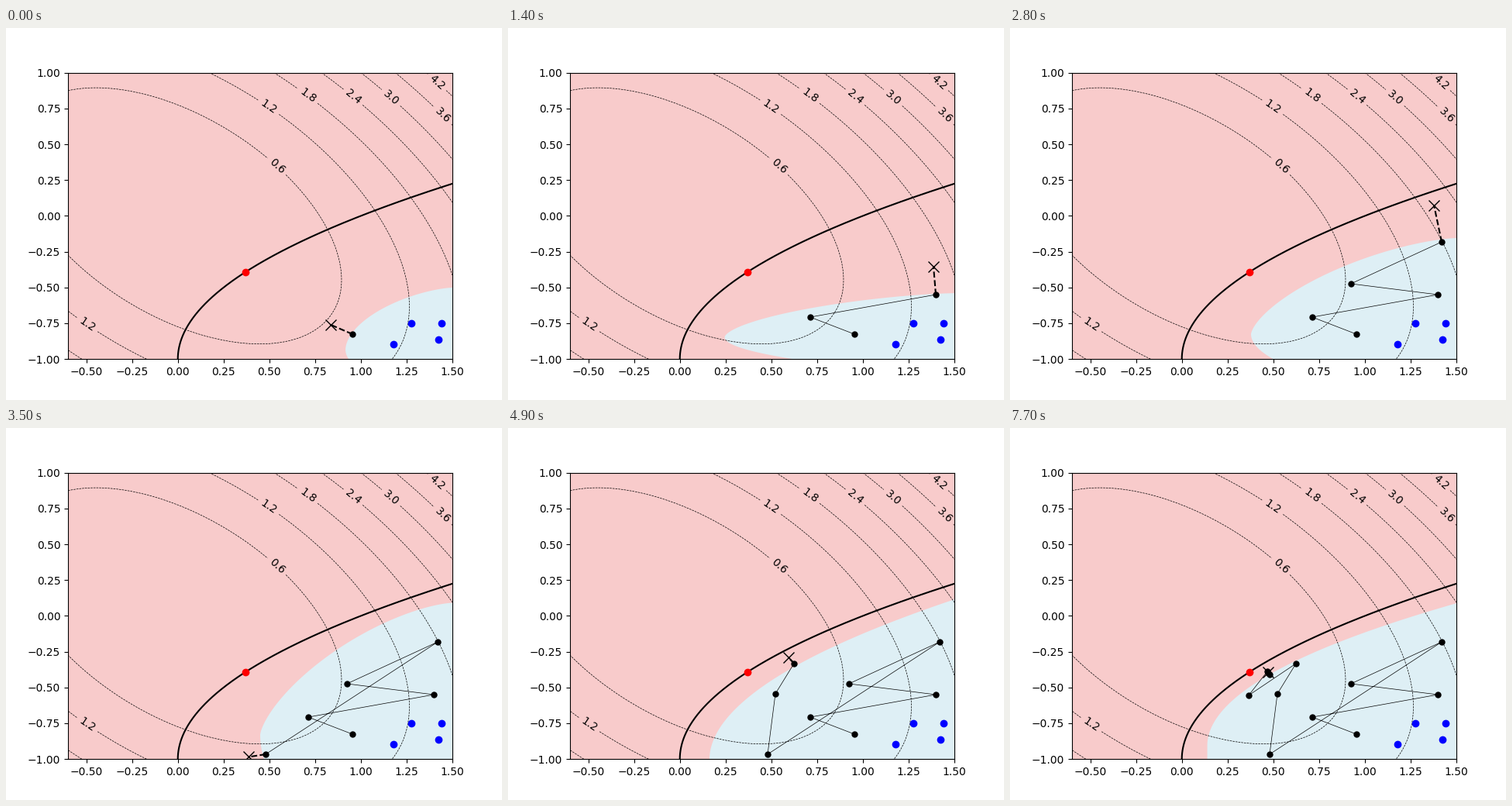
A matplotlib script that plays this animation: 640 by 480 pixels, repeating every 8 s.

```python
import numpy as np
import matplotlib.pyplot as plt
from matplotlib.animation import FuncAnimation

PINK, SKY = (248 / 255, 203 / 255, 203 / 255), (222 / 255, 239 / 255, 245 / 255)
STEP_MS, TICK_MS, LOOP_MS = 700, 100, 8000
X_MIN, X_MAX = -0.6, 1.5
SETTLE = 6  # step from which the border follows a square root

samples = np.array([
    (0.954, -0.826), (0.7125, -0.707), (1.3985, -0.550), (0.924, -0.474),
    (1.4195, -0.182), (0.4796, -0.9665), (0.522, -0.544), (0.6236, -0.333),
    (0.3653, -0.555), (0.467, -0.388), (0.471, -0.399), (0.4796, -0.409)])
seeds = np.array([(1.2756, -0.75), (1.4407, -0.75), (1.4238, -0.864), (1.1782, -0.896)])

# Estimated border at each step: leftmost point, then height at the right edge
borders = [
    (0.916, -0.934, -0.501), (0.463, -0.858, -0.566), (0.245, -0.847, -0.540),
    (0.272, -0.804, -0.382), (0.378, -0.826, -0.155), (0.450, -0.830, 0.091),
    (0.179, -1, 0.110), (0.162, -1, 0.115), (0.156, -1, 0.115),
    (0.111, -0.920, 0.110), (0.137, -0.910, 0.089), (0.139, -0.907, 0.088)]


def border(k, n=400):
    """Curve from the bottom edge round the leftmost point to the right edge."""
    x0, y0, end = borders[k]
    if k < SETTLE:
        bend, power = 1.5, 0.55 + 0.03 * k
    else:
        bend, power = 1, 0.5 + 0.16 * 0.1 ** (k - SETTLE)
    flare = 16 * np.exp(-((k - 2) / 1.7) ** 2)
    y = np.linspace(-1, y0, n, endpoint=False)
    u = np.linspace(0, 1, n) ** 2
    lower = np.c_[x0 + flare * (y - y0) ** 2, y]
    upper = np.c_[x0 + (X_MAX - x0) * u,
                  y0 + (end - y0) * (1 - (1 - u) ** bend) ** power]
    return np.vstack([lower, upper])


def probe(k):
    """Step from the sample along the outward normal of the border."""
    path, p = border(k), samples[k]
    j = np.clip(np.argmin(np.hypot(*(path - p).T)), 1, len(path) - 2)
    tx, ty = path[j + 1] - path[j - 1]
    reach = 0.135 + 0.031 * k if k < 5 else 0.096 * 0.75 ** (k - 5)
    return p + reach * np.array([-ty, tx]) / np.hypot(tx, ty)


steps = range(len(samples))
regions = [np.vstack([border(k), (X_MAX, -1)]) for k in steps]
probes = np.array([probe(k) for k in steps])

fig, ax = plt.subplots(figsize=(6.4, 4.8), dpi=100)
ax.set_xlim(X_MIN, X_MAX)
ax.set_ylim(-1, 1)
ax.set_facecolor(PINK)
region = ax.fill(*regions[0].T, color=SKY, lw=0, zorder=1)[0]

# Objective
X, Y = np.meshgrid(np.linspace(X_MIN, X_MAX, 100), np.linspace(-1, 1, 100))
cs = ax.contour(X, Y, X**2 + X * Y + Y**2, levels=0.6 * np.arange(1, 8),
                colors="k", linestyles="dashed", linewidths=0.5)
ax.clabel(cs, fmt="%.1f", fontsize=10, manual=[
    (0.543, 0.349), (0.501, 0.765), (0.713, 0.844), (0.962, 0.836),
    (1.168, 0.830), (1.451, 0.706), (1.421, 0.940), (-0.494, -0.755)])

# Constraint y = sqrt(x) - 1 and its optimum, with x = s^2
s = np.linspace(0, np.sqrt(X_MAX), 300)
ax.plot(s**2, s - 1, "k", lw=1.5)
best = max(np.roots([4, 3, 0, -2]), key=np.real).real
trail, = ax.plot([], [], "ko-", lw=0.5, ms=5)
link, = ax.plot([], [], "k--", lw=1.5)
cross, = ax.plot([], [], "kx", ms=10)
ax.plot(*seeds.T, "bo", ms=6)
ax.plot(best**2, best - 1, "ro", ms=6)


def update(i):
    k = i * TICK_MS // STEP_MS
    region.set_xy(regions[k])
    trail.set_data(*samples[:k + 1].T)
    link.set_data(*np.array([samples[k], probes[k]]).T)
    cross.set_data(*probes[k:k + 1].T)
    return region, trail, link, cross


anim = FuncAnimation(fig, update, frames=LOOP_MS // TICK_MS, interval=TICK_MS,
                     repeat=True, repeat_delay=0)
plt.show()
```
